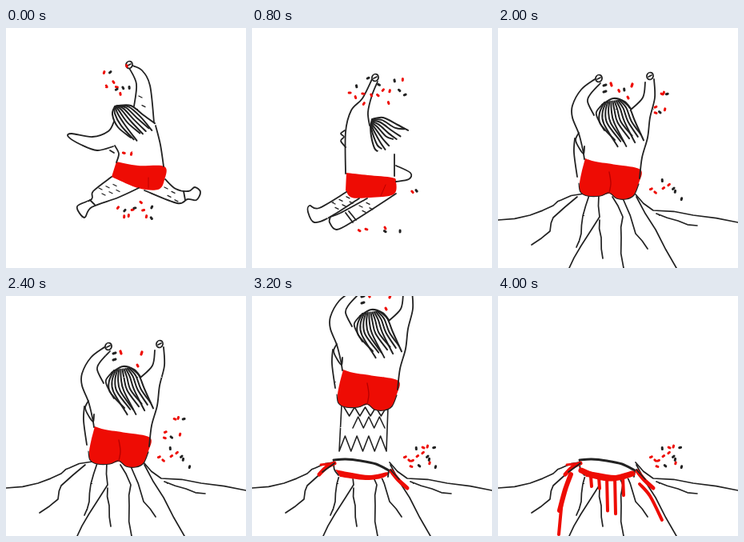
Recreate the animation shown at these times as an HTML page with a canvas. Size 300 px wide and 300 px high, loop 4.2 s.

```html
<!DOCTYPE html>
<html>
<head>
<meta charset="utf-8">
<style>
html, body { margin: 0; width: 100%; height: 100%; overflow: hidden; background: #fff; }
canvas { display: block; width: 100vw; height: 100vh; filter: url(#pencil); }
svg { position: absolute; width: 0; height: 0; }
</style>
</head>
<body>
<svg><filter id="pencil" x="0" y="0" width="1" height="1" color-interpolation-filters="sRGB">
<feTurbulence type="fractalNoise" baseFrequency=".3" seed="4"/>
<feDisplacementMap in="SourceGraphic" scale="1.6" xChannelSelector="R" yChannelSelector="G"/>
</filter></svg>
<canvas id="stage" width="300" height="300"></canvas>
<script>
const c = document.getElementById('stage').getContext('2d');
const INK = '#222', RED = '#ee0c04', CREASE = '#b80000';
c.lineCap = c.lineJoin = 'round';

const points = s => s.split(' ').map(p => p.split(',').map(Number));
const mix = (a, b, k) => a + (b - a) * k;
function random(seed) {
  return () => {
    seed = (seed * 16807 + 11) % 2147483647;
    return seed / 2147483647;
  };
}

// Smooth curve through the points; sharp = straight segments
function trace(p, sharp) {
  const at = i => p[Math.max(0, Math.min(p.length - 1, i))];
  c.beginPath();
  c.moveTo(...p[0]);
  for (let i = 0; i < p.length - 1; i++) {
    const [a, b, d, e] = [at(i - 1), at(i), at(i + 1), at(i + 2)];
    if (sharp) c.lineTo(...d);
    else c.bezierCurveTo(b[0] + (d[0] - a[0]) / 6, b[1] + (d[1] - a[1]) / 6,
      d[0] - (e[0] - b[0]) / 6, d[1] - (e[1] - b[1]) / 6, ...d);
  }
}
function stroke(p, width = 1.8, color = INK, sharp = false) {
  c.lineWidth = width;
  c.strokeStyle = color;
  trace(p, sharp);
  c.stroke();
}
const line = (s, width, color) => stroke(points(s), width, color);
const lines = (...list) => list.forEach(s => line(s));
function fill(s, color) {
  trace(points(s));
  c.closePath();
  c.fillStyle = color;
  c.fill();
}
function fist(x, y) {
  c.beginPath();
  c.ellipse(x, y, 4, 4.5, 0.4, 0, 7);
  c.fillStyle = '#fff';
  c.fill();
  c.lineWidth = 1.8;
  c.strokeStyle = INK;
  c.stroke();
  line(`${x - 2},${y + 1} ${x + 2},${y - 1}`);
}

// Strands blended from the first outline to the last, with uneven ends
function hair(first, last, count, seed) {
  const a = points(first), b = points(last), rnd = random(seed);
  for (let i = 0; i < count; i++) {
    const k = i / (count - 1), end = rnd() * 12 - 6;
    stroke(a.map(([x, y], j) => [mix(x, b[j][0], k), mix(y, b[j][1], k) + (j === a.length - 1 ? end : 0)]), 2);
  }
}
function confetti(seed, count, x, y, w, h, reds = 0.65) {
  const rnd = random(seed * 7919);
  for (let i = 0; i < count; i++) {
    // Even spread across, random height
    const px = x + w * (i + rnd()) / count, py = y + h * rnd(), a = rnd() * 3;
    stroke([[px, py], [px + Math.cos(a) * 2, py + Math.sin(a) * 2]], 3, i < count * reds === (i % 3 < 2) ? RED : INK);
  }
}
function ticks(x, y, slope, count) {
  for (let i = 0; i < count * 2; i++) {
    const px = x + (i >> 1) * 9 + i % 2 * 4, py = y + (px - x) * slope + i % 2 * 8;
    stroke([[px - 2, py - 1], [px + 2, py + 1]], 1.3);
  }
}
function zigzag(x0, x1, low, high, teeth) {
  const p = [];
  for (let i = 0; i <= teeth * 2; i++) p.push([mix(x0, x1, i / teeth / 2), i % 2 ? high : low]);
  return p;
}
function place(x, y, sx, sy, draw) {
  c.save();
  c.translate(x, y);
  c.scale(sx, sy);
  draw();
  c.restore();
}
function clipped(left, right, bottom, draw) {
  c.save();
  c.beginPath();
  c.rect(left, 0, right - left, bottom);
  c.clip();
  draw();
  c.restore();
}

function leap() {
  fill('138,167 165,172 198,173 198,190 190,202 165,200 132,186', RED);
  line('178,187 178,200', 1, CREASE);
  lines('158,47 170,53 180,72 185,118', '154,50 163,70 160,98', '135,117 128,129 108,136 82,132 78,136 94,146 114,153 134,148',
    '136,147 141,157 138,168', '187,122 193,146 197,173', '130,153 135,156');
  fist(154, 46);
  hair('136,98 133,108 140,124 156,143', '140,97 156,97 172,109 186,124', 9, 3);
  lines('132,186 109,204 107,214 89,223 98,237 107,224 140,212 166,200',
    '199,189 212,201 228,204 236,199 243,205 238,215 227,214 214,219 173,203', '222,204 224,215', '105,215 111,221');
  ticks(118, 201, -0.25, 3);
  ticks(200, 200, 0.6, 2);
  ticks(168, 86, 0.9, 1);
  confetti(5, 10, 122, 46, 32, 36);
  confetti(2, 11, 140, 217, 46, 23);
  confetti(1, 2, 146, 154, 12, 3, 1);
}

function sit() {
  fill('118,181 145,184 175,187 180,192 177,208 148,212 125,212 117,203', RED);
  line('167,196 161,210', 1, CREASE);
  lines('150,64 138,88 124,103 117,130 117,182', '157,67 150,84 145,105 147,122', '178,158 178,185',
    '180,172 198,181 196,189 180,192', '116,128 111,132 115,136 111,141 117,149');
  fist(154, 62);
  hair('148,122 149,135 153,150 157,160', '150,114 164,112 182,121 195,128', 9, 8);
  lines('118,205 84,225 72,222 70,230 78,243 98,236 134,213', '98,236 97,243 106,252 129,240 180,207',
    '98,236 111,231 144,213', '117,231 126,243', '121,229 130,240');
  ticks(102, 219, -0.4, 3);
  ticks(136, 223, -0.4, 2);
  confetti(4, 16, 120, 62, 74, 32);
  confetti(9, 5, 126, 246, 66, 8);
  confetti(6, 2, 197, 197, 15, 8, 0.5);
}

function kneel() {
  fill('109,163 122,167 148,171 178,177 176,194 170,209 160,214 148,213 139,207 128,210 112,210 103,205 102,194 105,178', RED);
  line('101,194 103,205 112,210 128,210 139,206 148,213 160,214 170,209 176,195', 1.2);
  line('139,180 141,194 139,206', 1.4, CREASE);
  lines('121,64 104,77 93,97 93,112 101,132 106,152 108,164', '128,69 116,82 112,92 120,109',
    '184,68 181,87 166,102', '195,64 196,87 190,112 187,137 180,162 177,188',
    '101,131 97,140 102,151 107,157 108,148', '96,138 95,156 99,186');
  fist(126, 63);
  fist(190, 60);
  hair('133,93 127,106 128,120 146,146', '154,90 164,99 171,116 182,136', 11, 21);
  line('130,96 144,88 158,92 166,101', 2.2);
  lines('131,95 123,105 125,114 133,128');
}
const feet = () => lines('110,207 102,208 96,211', '106,208 109,215', '145,214 151,218 153,225', '160,214 168,218 176,224');

function nearBits() {
  stroke([[141, 69], [142, 72]], 3.2, RED);
  stroke([[168, 70], [167, 73]], 3.2, RED);
  stroke([[162, 86], [163, 88]], 3, RED);
  for (const y of [72, 80]) stroke([[132, y], [135, y - 1]], 3);
}
// The upper handful drops onto the pile as fall goes 0..1
function farBits(fall) {
  if (!fall) confetti(3, 2, 150, 70, 8, 8, 0.5);
  confetti(12, 7, 194, mix(71, 178, fall), mix(20, 38, fall), 45);
  confetti(7, 8, 190, 187, 42, 26);
}

// Each crack wanders between its key points
function cracks() {
  const rnd = random(77), wobble = () => rnd() * 4 - 2;
  for (const s of ['108,207 79,215 69,222 40,234 0,240', '99,211 69,237 65,254 42,271', '114,209 106,235 104,257 98,274',
    '126,208 127,236 104,272 89,300', '127,240 129,262 131,288', '143,211 156,236 154,262 157,300', '156,213 172,257 187,276',
    '173,211 197,252 223,300', '172,208 194,228 244,234 300,243', '198,232 225,241 249,247']) {
    const p = points(s), bent = [p[0]];
    for (let i = 1; i < p.length; i++) {
      const [x, y] = p[i - 1], [u, v] = p[i];
      bent.push([mix(x, u, 0.5) + wobble(), mix(y, v, 0.5) + wobble()], [u, v]);
    }
    stroke(bent, 1.7, INK, true);
  }
}

function spikes() {
  const skirt = [[107, 208], ...zigzag(104, 163, 265, 246, 4), [165, 210]];
  trace(skirt, true);
  c.fillStyle = '#fff';
  c.fill();
  stroke(skirt, 1.6, INK, true);
  stroke(zigzag(121, 161, 236, 222, 3), 1.6, INK, true);
  stroke(zigzag(110, 163, 210, 221, 4), 1.6, INK, true);
}

function crater() {
  fill('102,206 125,205 146,207 171,217 170,226 140,229 107,226', '#fff');
  fill('104,217 125,221 148,224 171,220 164,227 142,230 110,226', RED);
  line('102,205 117,204 136,206 155,210 171,218', 3);
  lines('102,207 103,217 108,224', '171,218 170,226');
  line('103,209 86,211', 3, RED);
  line('103,209 93,214 84,223', 5, RED);
  line('174,219 183,230 194,240', 5, RED);
  lines('103,209 88,220', '173,217 184,229');
}

function lava() {
  const rnd = random(31);
  line('91,223 84,242 77,268', 6, RED);
  line('80,255 76,298', 4, RED);
  line('104,218 122,225 144,228 168,222', 7, RED);
  for (let i = 0; i < 5; i++) {
    const x = 116 + i * 10;
    line(`${x},226 ${x + 1},${238 + rnd() * 35}`, 4, RED);
  }
  line('177,235 190,250 205,280', 4, RED);
}

const dancers = [
  leap,
  sit,
  () => place(312, -2, -1, 1, leap),
  () => place(-18, 2, 1.108, 0.985, leap),
  sit,
  () => { place(0, -26, 1, 1, () => { kneel(); feet(); nearBits(); }); farBits(0); }
];

const KNEEL = 6, SHAKE = 10, LIFT = 13, FLOW = 17, GONE = 20;

function draw(step) {
  c.fillStyle = '#fff';
  c.fillRect(0, 0, 300, 300);
  if (step < KNEEL) return dancers[step]();

  const spread = step - KNEEL - 1, lift = step - LIFT;
  if (spread >= 3) cracks();
  else if (spread >= 0) clipped(76 - 51 * spread, 177 + 35 * spread, 233 + 32 * spread, cracks);
  if (lift > 1) crater();
  if (step >= FLOW) clipped(0, 300, 255 + 32 * (step - FLOW), lava);
  farBits(Math.max(0, Math.min(1, (step - SHAKE) / 3)));
  if (lift === 1) {
    line('89,189 102,200', 4, RED);
    line('172,206 175,214 181,205', 4, RED);
  }
  if (step === GONE) return;

  const shake = step > SHAKE && lift <= 0 ? (step % 2 ? -3 : 2) : 0;
  // Slow strain at first, then a steady flight
  const rise = lift < 3 ? Math.max(0, lift) * 18 : 71 + 50 * (lift - 3);
  place(lift < 3 ? shake : 5, -rise, 1, 1, () => {
    if (lift > 0) spikes();
    kneel();
    nearBits();
    if (step === KNEEL) feet();
  });
}

function tick() {
  draw(Math.floor(performance.now() % 4200 / 200));
  requestAnimationFrame(tick);
}
tick();
</script>
</body>
</html>
```
